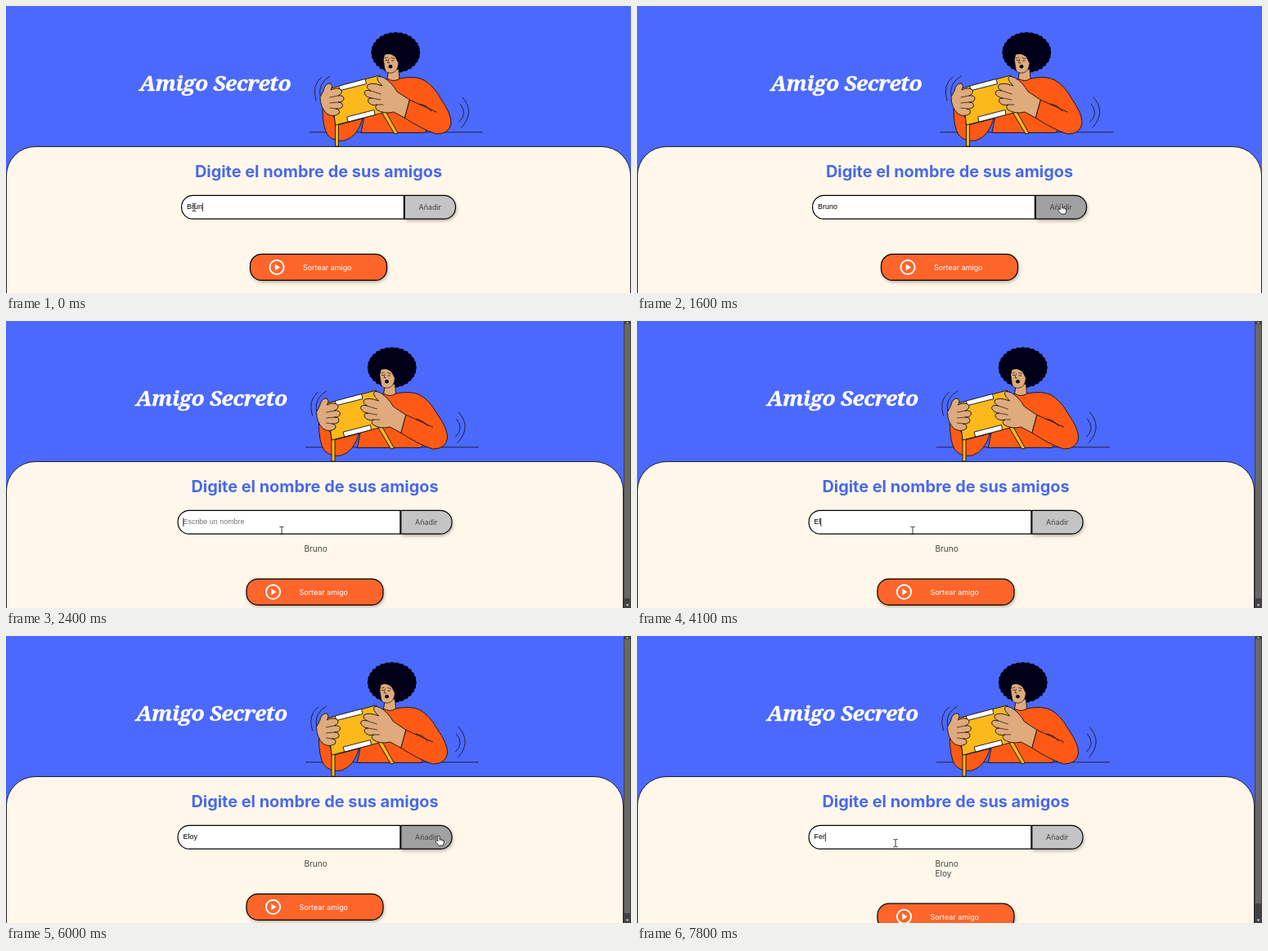
These frames come from a looping animation (764 px wide and 352 px high, 8 s). An HTML page with a canvas:

```html
<!DOCTYPE html>
<html lang="es">
<head>
<meta charset="utf-8">
<title>Amigo Secreto</title>
<style>
html, body { margin: 0; width: 100%; height: 100%; overflow: hidden; background: #4b69fd; }
canvas { display: block; width: 764px; height: 352px; }
</style>
</head>
<body>
<canvas id="stage"></canvas>
<script>
const W = 764, H = 352, LOOP = 8000;
const BLUE = '#4b69fd', CREAM = '#fff8ea', ORANGE = '#fe5a16', SKIN = '#dfaa7c',
      YELLOW = '#fdb91c', NAVY = '#020019', INK = '#111';
const canvas = document.getElementById('stage');
const ctx = canvas.getContext('2d');
const dpr = window.devicePixelRatio || 1;
canvas.width = W * dpr;
canvas.height = H * dpr;

const typed = [[0, 'Brun'], [100, 'Bruno'], [1700, ''], [3400, 'E'], [4100, 'El'], [4200, 'Elo'],
  [4600, 'Eloy'], [6100, ''], [7500, 'F'], [7600, 'Fe'], [7800, 'Fer']];
const caretOn = [[0, 800], [1300, 1500], [2400, 2800], [3400, 5200], [5600, 5900], [6800, 7300], [7500, 8000]];
const friends = [[1700, 'Bruno'], [6100, 'Eloy']];

const easeOut = u => 1 - (1 - u) ** 2;
const smooth = u => u * u * (3 - 2 * u);
// start, end, from x, from y, to x, to y, easing
const moves = [
  [700, 1200, 230, 247, 508, 243, smooth],
  [1200, 1600, 508, 243, 518.5, 243, easeOut],
  [1700, 2400, 518.5, 243, 337, 257, smooth],
  [5100, 6000, 337, 257, 529, 245, easeOut],
  [6100, 6800, 529, 245, 316, 254, smooth]
];

function pointer(t) {
  let pos = [moves[0][2], moves[0][3]];
  for (const [a, b, x0, y0, x1, y1, ease] of moves) {
    if (t < a) break;
    const u = ease(Math.min(1, (t - a) / (b - a)));
    pos = [x0 + (x1 - x0) * u, y0 + (y1 - y0) * u];
  }
  return pos;
}

function shape(d, fill, stroke = INK, width = 0.9) {
  const p = new Path2D(d);
  if (fill) { ctx.fillStyle = fill; ctx.fill(p); }
  if (stroke) { ctx.strokeStyle = stroke; ctx.lineWidth = width; ctx.stroke(p); }
}

function text(s, x, y, font, color, align = 'left') {
  ctx.font = font;
  ctx.fillStyle = color;
  ctx.textAlign = align;
  ctx.fillText(s, x, y);
}

function box(x, y, w, h, radii, fill, shadow) {
  ctx.beginPath();
  ctx.roundRect(x, y, w, h, radii);
  ctx.fillStyle = fill;
  ctx.save();
  if (shadow) {
    ctx.shadowColor = 'rgba(0,0,0,.35)';
    ctx.shadowBlur = 4 * dpr;
    ctx.shadowOffsetX = dpr;
    ctx.shadowOffsetY = 2 * dpr;
  }
  ctx.fill();
  ctx.restore();
  ctx.strokeStyle = '#000';
  ctx.lineWidth = 1.2;
  ctx.stroke();
}

function disc(x, y, rx, ry, fill) {
  ctx.beginPath();
  ctx.ellipse(x, y, rx, ry, 0, 0, Math.PI * 2);
  ctx.fillStyle = fill;
  ctx.fill();
}

function hair() {
  disc(476.3, 57, 27, 22, NAVY);
  for (let i = 0; i < 28; i++) {
    const a = i / 28 * Math.PI * 2;
    disc(476.3 + 26 * Math.cos(a), 57 + 21 * Math.sin(a), 4, 4, NAVY);
  }
}

function face() {
  shape('M468 78 L466 89 Q474 94 481 89 L480 78 Z', SKIN);
  shape('M463 60 Q470 57 476 63 L479.5 70 Q480 79 472 82 Q464 83 463 77 L461.5 67 Z', SKIN, null);
  shape('M479.5 72 Q479 80 472 82 Q464 83 463 77 L461.5 67', null, INK, 0.7);
  shape('M463.5 64 L466.5 63 M471 63.5 L475 64.5 M468 65 L466.5 69.5 L469 70', null, INK, 0.7);
  shape('M464 66.5 H466 M471.5 67 H474', null, INK, 0.8);
  disc(470, 74.2, 2.4, 2.2, NAVY);
}

function picture() {
  ctx.lineJoin = ctx.lineCap = 'round';
  shape('M371 154.8 H582', null, INK, 0.8);
  hair();
  // torso and far arm
  shape('M434 155 L440 125 Q450 94 467 89 Q474 93 481 89 Q500 85 511 91 L531 130 L512 155 Z', ORANGE);
  face();
  shape('M387 126 Q387 148 393 158 Q401 167 414 165 Q430 160 436 138 L405 146 Q400 130 392 128 Z', ORANGE);
  // drum and its legs
  shape('M402.5 145 V172 H406.5 V144 Z', YELLOW);
  shape('M459 130 L475 157 L479 156 L464 129 Z', YELLOW);
  shape('M397 101 L457 85 L468 129 L403 146 Z', YELLOW);
  shape('M407 98 L439 89.5 L440.5 95.5 L409 103.5 Z', '#fff');
  shape('M417 136 L450 127.5 L451 133.5 L418.5 142 Z', '#fff');
  // near arm
  shape('M511 91 Q523 98 531 113 Q545 133 544 144 Q542 157 526 157 Q508 151 487 137 L493 115 Z', ORANGE, null);
  shape('M511 91 Q523 98 531 113 Q545 133 544 144 Q542 157 526 157 Q508 151 487 137 L493 115 L526 130', null);
  shape('M506 120 L514 123 L520 129', null);
  // hands
  shape('M493 115 L478 105 Q471 93 462 88 Q453 84 454 90 Q455 93 460 98 Q447 93 442 97 Q440 101 446 104 ' +
    'Q438 102 438 107 Q440 112 447 113 Q441 113 443 118 Q447 123 454 121 Q450 123 453 127 Q462 133 474 130 L487 137 Z', SKIN);
  shape('M446 104 L458 108 M447 113 L458 115 M454 121 L461 121', null, INK, 0.7);
  shape('M388 104 Q390 94 397 95 Q400 98 397 103 Q405 99 410 103 Q412 107 406 110 Q413 109 413 114 Q412 118 406 118 ' +
    'Q413 118 411 124 Q408 127 403 126 Q409 127 407 132 Q400 137 392 132 Q384 124 384 112 Z', SKIN);
  shape('M406 110 L396 112 M406 118 L396 119 M403 126 L396 125', null, INK, 0.7);
  // shaking marks
  shape('M379 116 Q373 97 386 87 M384 110 Q381 95 396 86', null, INK, 0.8);
  shape('M558 112 Q574 130 557 149 M555 120 Q565 132 554 142', null, INK, 0.8);
}

function scrollbar(thumbEnd) {
  ctx.fillStyle = '#424242';
  ctx.fillRect(755, 0, 9, H);
  ctx.fillStyle = '#686868';
  ctx.fillRect(756, 4, 7, thumbEnd - 4);
  shape('M757.5 3 L759.5 0.5 L761.5 3 Z', '#9a9a9a', null);
  shape('M757.5 347.5 L759.5 350 L761.5 347.5 Z', '#d0d0d0', null);
}

function title() {
  ctx.letterSpacing = '-0.5px';
  text('Amigo Secreto', 255.8, 104.3, 'italic bold 26.3px "Noto Serif", serif', '#fff', 'center');
  ctx.strokeStyle = '#fff';
  ctx.lineWidth = 0.4;
  ctx.strokeText('Amigo Secreto', 255.8, 104.3);
  ctx.letterSpacing = '0px';
}

function form(t, value, hover) {
  text('Digite el nombre de sus amigos', 382, 209.6, 'bold 19.9px Inter, sans-serif', '#4969ea', 'center');
  box(487.3, 232.3, 62.2, 28.9, [0, 14, 14, 0], hover ? '#a1a1a1' : '#c4c4c4', true);
  text('Añadir', 518.2, 249.8, '8.95px Inter, sans-serif', '#444', 'center');
  box(214.6, 232.3, 271.8, 28.9, [14, 0, 0, 14], '#fff');
  const font = '8.95px "Liberation Sans", Arial, sans-serif';
  text(value || 'Escribe un nombre', 221, 249.3, font, value ? '#000' : '#757575');
  if (caretOn.some(([a, b]) => t >= a && t < b)) {
    const w = value ? ctx.measureText(value).width : 0;
    ctx.fillStyle = '#000';
    ctx.fillRect(221 + w, 241.5, 0.8, 10.5);
  }
}

function drawButton(y) {
  box(298.5, y, 167, 32, 14, '#fe652b', true);
  const cy = y + 16;
  ctx.beginPath();
  ctx.arc(331, cy, 8.6, 0, Math.PI * 2);
  ctx.strokeStyle = '#fff';
  ctx.lineWidth = 1.9;
  ctx.stroke();
  shape(`M328.8 ${cy - 4} L335 ${cy} L328.8 ${cy + 4} Z`, '#fff', null);
  text('Sortear amigo', 363, y + 19.5, '8.95px Inter, sans-serif', '#fff');
}

function drawPointer(x, y, hand) {
  ctx.save();
  ctx.translate(x, y);
  if (hand) {
    ctx.scale(0.93, 0.93);
    shape('M-1.2 7 V0.6 Q0 -1 1.2 0.6 V4.6 Q3 3.8 3.3 5.2 Q5 4.6 5.2 6 Q6.7 5.6 6.8 7 V9.5 L5.6 13 H0 ' +
      'L-4 8.2 Q-4.4 6.6 -2.8 6.6 Z', '#fff', '#000', 0.8);
    shape('M1.2 4.6 V7 M3.3 5.2 V7 M5.2 6 V7.4', null, '#000', 0.6);
  } else {
    shape('M-2.5 -4.5 H-0.7 L0 -4 L0.7 -4.5 H2.5 M0 -4 V4 M-2.5 4.5 H-0.7 L0 4 L0.7 4.5 H2.5', null, '#222', 0.9);
  }
  ctx.restore();
}

function draw(t) {
  const list = friends.filter(f => t >= f[0]);
  const value = typed.filter(s => t >= s[0]).pop()[1];
  const pageW = list.length ? 755 : W;
  const [px, py] = pointer(t);
  const hand = px >= (list.length ? 482 : 487);

  ctx.setTransform(dpr, 0, 0, dpr, 0, 0);
  ctx.fillStyle = BLUE;
  ctx.fillRect(0, 0, W, H);

  ctx.beginPath();
  ctx.roundRect(0.5, 172.5, pageW - 1, 240, [35.5, 35.5, 0, 0]);
  ctx.fillStyle = CREAM;
  ctx.fill();
  ctx.strokeStyle = '#111';
  ctx.lineWidth = 0.9;
  ctx.stroke();

  ctx.save();
  ctx.translate((pageW - W) / 2, 0);
  title();
  picture();
  form(t, value, hand && t > 1200);
  list.forEach(([, name], i) => text(name, 369, 282.6 + 12 * i, '10.06px Inter, sans-serif', '#444'));
  drawButton(304.4 + 11.9 * list.length);
  ctx.restore();

  if (list.length) scrollbar(352 - 12 * list.length);
  drawPointer(px, py, hand);
}

function tick(now) {
  draw(Math.floor(now % LOOP / 100) * 100);
  requestAnimationFrame(tick);
}
requestAnimationFrame(tick);
</script>
</body>
</html>
```
